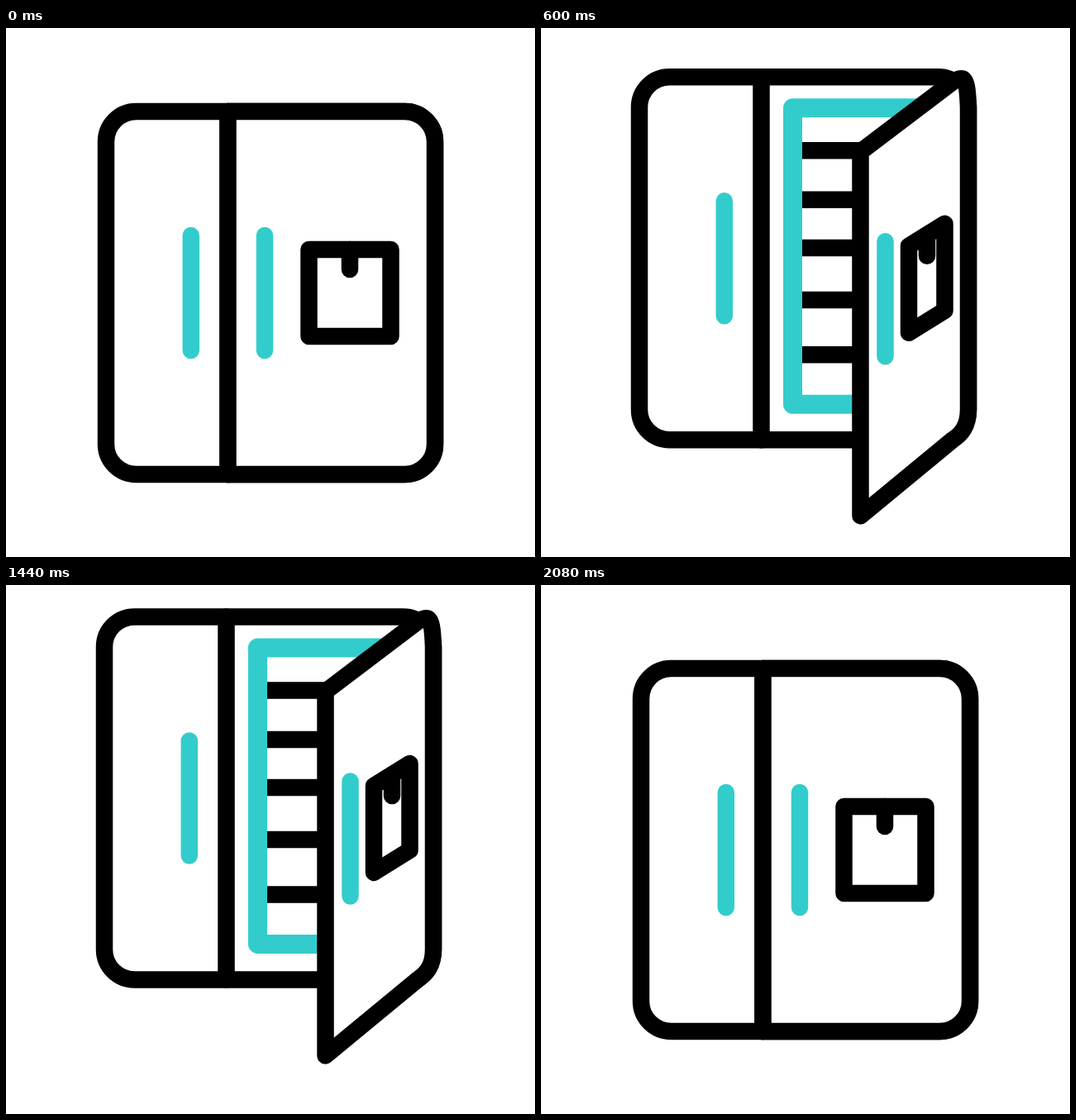
An HTML page with a canvas for the animation above (2.62 s loop, 640x640 px).

```html
<!DOCTYPE html>
<html lang="en">
<head>
<meta charset="utf-8">
<title>Fridge</title>
<style>
html, body { margin: 0; width: 100%; height: 100%; overflow: hidden; background: #fff; }
canvas { display: block; width: 640px; height: 640px; }
</style>
</head>
<body>
<canvas id="stage" width="640" height="640"></canvas>
<script>
const ctx = document.getElementById('stage').getContext('2d');
const LOOP = 2620, BLACK = '#000', TEAL = '#33cccc';
const RIGHT = 519, TOP = 101, BOTTOM = 540, RADIUS = 36.5;

// [time, value] keys
const LIFT = [[0, 0], [200, -3.8], [360, -9.5], [540, -38.8], [600, -41.7], [1080, -54.5], [1140, -56.2],
  [1260, -62.7], [1440, -62.7], [1600, -46.8], [1820, -22.7], [1980, -8.8], [2080, 0], [LOOP, 0]];
const SWAY = [[0, 0], [360, -1.5], [600, -2], [1440, -2], [1600, -1.5], [1820, -0.7], [2080, 0], [LOOP, 0]];

function track(keys, t) {
  const i = keys.findIndex(k => k[0] > t);
  const [t0, v0] = keys[i - 1], [t1, v1] = keys[i];
  return v0 + (v1 - v0) * (t - t0) / (t1 - t0);
}

function ease(t, start, end) {
  const u = Math.min(1, Math.max(0, (t - start) / (end - start)));
  return u * u * (3 - 2 * u);
}

function stroke(color, width = 20.5) {
  ctx.strokeStyle = color;
  ctx.lineWidth = width;
  ctx.stroke();
}

function line(x1, y1, x2, y2, color = BLACK) {
  ctx.beginPath();
  ctx.moveTo(x1, y1);
  ctx.lineTo(x2, y2);
  stroke(color);
}

function drawBody() {
  ctx.beginPath();
  ctx.roundRect(121, TOP, RIGHT - 121, BOTTOM - TOP, RADIUS);
  stroke(BLACK);
  line(268.5, TOP, 268.5, BOTTOM);
  line(223.8, 251, 223.8, 390, TEAL);
  for (const y of [190, 249.5, 307.7, 370.7, 437]) line(306.5, y, 483, y);
  ctx.beginPath();
  ctx.rect(306.5, 138.5, 176.5, 358.5);
  stroke(TEAL, 23);
}

function drawDoor(open) {
  const left = 268.5 + 120 * open;
  const swell = open * (1 - open);
  const inset = RADIUS * (RIGHT - left) / (RIGHT - 268.5);
  const bend = RIGHT - inset;

  ctx.beginPath();
  ctx.moveTo(left, TOP + 90.5 * open);
  ctx.lineTo(bend, TOP + 6 * open + 27 * swell);
  ctx.bezierCurveTo(502.6 + 12.5 * open, TOP - 3 * open + 12 * swell,
    RIGHT - 1.5 * open, 117.4 - 15.4 * open, RIGHT, TOP + RADIUS);
  ctx.lineTo(RIGHT, BOTTOM - RADIUS);
  ctx.bezierCurveTo(RIGHT, BOTTOM - 16.4, bend + 0.55 * inset, BOTTOM - 7 * open, bend, BOTTOM);
  ctx.lineTo(left, BOTTOM + 92 * open);
  ctx.closePath();
  ctx.fillStyle = '#fff';
  ctx.fill();
  stroke(BLACK);

  const handle = 313 + 105.5 * open;
  line(handle, 251 + 49 * open, handle, 390 + 49 * open, TEAL);

  const x1 = 366.5 + 80.5 * open, x2 = 465.5 + 25 * open;
  const y1 = 268 + 37.5 * open, y2 = 268 + 10.5 * open;
  ctx.beginPath();
  ctx.moveTo(x1, y1);
  ctx.lineTo(x2, y2);
  ctx.lineTo(x2, y2 + 105);
  ctx.lineTo(x1, y1 + 105);
  ctx.closePath();
  stroke(BLACK);
  const spout = 416 + 53 * open;
  line(spout, 268 + 24 * open, spout, 292 + 25.5 * open);
}

function draw(now) {
  const t = now % LOOP;
  ctx.setTransform(1, 0, 0, 1, 0, 0);
  ctx.fillStyle = '#fff';
  ctx.fillRect(0, 0, 640, 640);
  ctx.translate(track(SWAY, t), track(LIFT, t));
  ctx.lineCap = ctx.lineJoin = 'round';
  drawBody();
  drawDoor(ease(t, 0, 598) - ease(t, 1460, 1880));
}

const start = performance.now();
function tick() {
  draw(performance.now() - start);
  requestAnimationFrame(tick);
}
tick();
</script>
</body>
</html>
```
